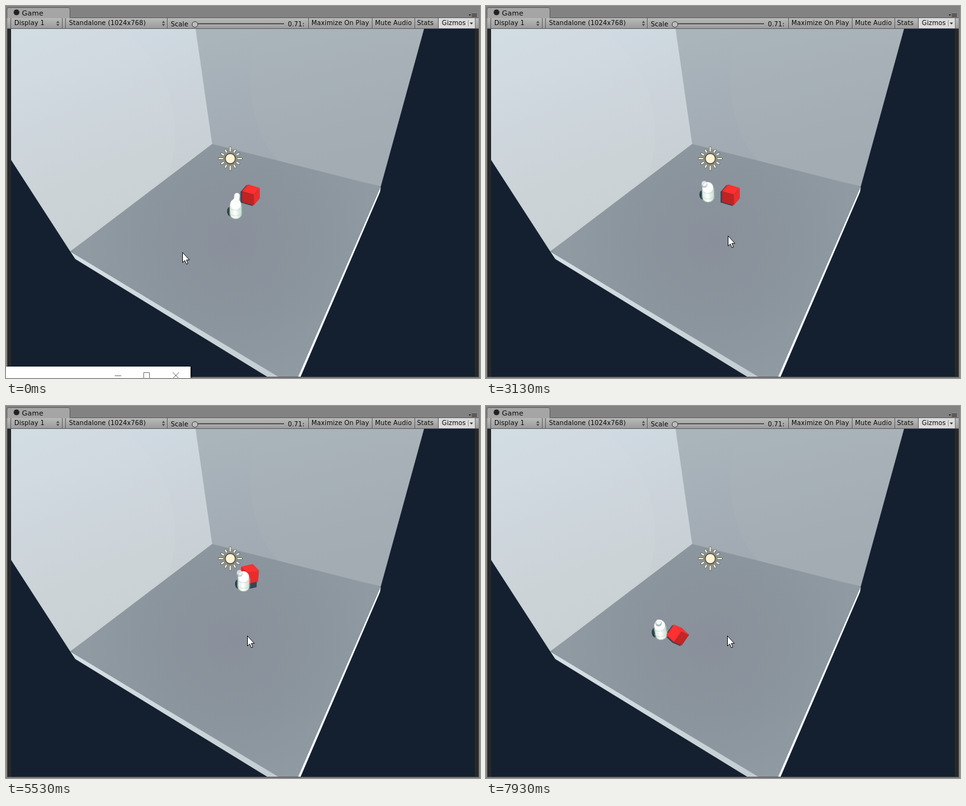
Animation, 745 px wide and 585 px high, one loop 8000 ms. Source, as an HTML page:

```html
<!DOCTYPE html>
<html lang="en">
<head>
<meta charset="utf-8">
<title>Room with cube</title>
<style>
  html, body { margin: 0; width: 100%; height: 100%; overflow: hidden; background: #828282; }
  svg { display: block; width: 745px; height: 585px; }
  text { font: 10px "DejaVu Sans", sans-serif; letter-spacing: .13px; fill: #0b0b0b; }
</style>
</head>
<body>
<svg viewBox="0 0 745 585">
  <defs>
    <linearGradient id="bar" x2="0" y2="1">
      <stop stop-color="#b9b9b9"/><stop offset="1" stop-color="#9c9c9c"/>
    </linearGradient>
    <linearGradient id="wallL" gradientUnits="userSpaceOnUse" x1="40" y1="36" x2="160" y2="350">
      <stop stop-color="#d1dde5"/><stop offset=".5" stop-color="#ccd4db"/><stop offset="1" stop-color="#c7ced1"/>
    </linearGradient>
    <linearGradient id="wallR" gradientUnits="userSpaceOnUse" x1="400" y1="36" x2="450" y2="260">
      <stop stop-color="#a9b4bb"/><stop offset="1" stop-color="#a0a8b1"/>
    </linearGradient>
    <radialGradient id="floor" gradientUnits="userSpaceOnUse" cx="355" cy="370" r="270">
      <stop stop-color="#89909b"/><stop offset=".5" stop-color="#8b959e"/><stop offset="1" stop-color="#919ca4"/>
    </radialGradient>
    <linearGradient id="skin">
      <stop stop-color="#dce8e5"/><stop offset=".45" stop-color="#fff"/><stop offset="1" stop-color="#cddbd8"/>
    </linearGradient>
    <linearGradient id="lip" gradientUnits="userSpaceOnUse" x1="101" y1="390" x2="420" y2="583">
      <stop stop-color="#d6e0e5"/><stop offset="1" stop-color="#c3cdd2"/>
    </linearGradient>
    <clipPath id="clipL"><path d="M8 36H298L324 217 101 386 8 242Z"/></clipPath>
    <clipPath id="clipR"><path d="M298 36H657L589 284 324 217Z"/></clipPath>
    <clipPath id="view"><path d="M8 36H737V583H8Z"/></clipPath>
  </defs>

  <g id="chrome"></g>

  <g clip-path="url(#view)">
    <path d="M8 36H737V583H8Z" fill="#142030"/>
    <!-- surfaces overlap, so no seam shows between them -->
    <path d="M324 210 589 284 459 583 452 598 101 386Z" fill="url(#floor)"/>
    <path d="M290 36H657L589 284 324 217 310 217Z" fill="url(#wallR)"/>
    <ellipse cx="555" cy="120" rx="172" ry="185" fill="#abb2b8" opacity=".25" clip-path="url(#clipR)"/>
    <path d="M8 36H298L324 217 101 386 8 242Z" fill="url(#wallL)"/>
    <ellipse cx="100" cy="200" rx="166" ry="186" fill="#d2dcd9" opacity=".22" clip-path="url(#clipL)"/>
    <path d="M101 386 428 583H410.500L109 398Z" fill="url(#lip)"/>
    <path d="M589 284 588 292 463 583H459Z" fill="#fbfdfd"/>
    <g id="actors">
      <path id="cubeShade" fill="#303c4b" opacity=".9"/>
      <g id="player">
        <ellipse cx="-7.500" cy="5" rx="6" ry="8" fill="#2d3b49"/>
        <g id="torso">
          <path d="M-9 9V-5A9 10 0 0 1 9 -5V9A9 7.500 0 0 1 -9 9Z" fill="url(#skin)"/>
          <g fill="none" stroke="#93cf9b" stroke-width=".8" opacity=".85">
            <path d="M-9.800 -4V9A9.800 8 0 0 0 9.800 9V-4"/>
            <path d="M-9.800 -2A9.800 5 0 0 0 9.800 -2M-9.800 6A9.800 6 0 0 0 9.800 6" opacity=".6"/>
          </g>
          <circle cy="-6" r="8" fill="#fff"/>
        </g>
        <path id="nose" stroke="#fbfdfd" stroke-width="8.500" stroke-linecap="round"/>
        <g id="noseCap"><circle r="5" cy="1" fill="#a9b4b9"/><circle r="4" cy="-1" fill="#f3f6f6"/></g>
      </g>
      <g id="cube"><path/><path/><path/></g>
    </g>
    <g id="sun" stroke-linecap="round"></g>
  </g>

  <g id="popup">
    <path d="M0 566H293V585H0Z" fill="#000" opacity=".3"/>
    <path d="M0 567H290V585H0Z" fill="#fff"/>
    <path d="M171 581.500H181M216.500 585V576.500H225.500V585M262 576 272 586M272 576 262 586" fill="none" stroke="#777"/>
  </g>
  <path id="cursor" d="M.5 .5V16.500L4 13.200 6.600 19 9 18 6.500 12.300H11.300Z" fill="#fff" stroke="#111"/>
</svg>

<script>
const $ = id => document.getElementById(id);
const LOOP = 8000, STEP = 1000 / 15;

function label(text, x, y, size = 10) {
  return `<text x="${x}" y="${y}" style="font-size:${size}px">${text}</text>`;
}
function rect(x, y, w, h, fill) {
  return `<rect x="${x}" y="${y}" width="${w}" height="${h}" fill="${fill}"/>`;
}
function drawChrome() {
  const seps = [7, 88, 93, 253, 475, 575, 642, 679].map(x => rect(x, 19, 1, 16, '#626262')).join('');
  const arrows = [81.5, 247.5].map(x =>
    `<path d="M${x - 2.5} 26.500h5l-2.500 -3zM${x - 2.5} 28.500h5l-2.500 3z" fill="#444"/>`).join('');
  $('chrome').innerHTML =
    rect(0, 0, 745, 585, '#828282') +
    '<path d="M1.500 19V5Q1.500 2.500 4 2.500H98Q100.500 2.500 100.500 5V19Z" fill="#a5a5a5" stroke="#5e5e5e"/>' +
    rect(2, 18, 741, 18, '#5f5f5f') + rect(2, 19, 741, 16, 'url(#bar)') +
    rect(2, 18, 98, 1, '#a5a5a5') + rect(680, 19, 57, 16, '#dcdcdc') + seps +
    rect(726, 22, 1, 10, '#999') + rect(737, 19, 1, 16, '#777') +
    rect(2, 36, 741, 548, '#292929') + rect(2, 583, 741, 1, '#555') +
    '<circle cx="16.500" cy="10" r="4.500" fill="#222"/>' +
    label('Game', 25, 15, 11.2) + label('Display 1', 13, 30) +
    label('Standalone (1024x768)', 99, 30) + label('Scale', 259, 32) +
    label('0.71:', 443, 32) + label('Maximize On Play', 480, 30) +
    label('Mute Audio', 580, 30) + label('Stats', 646, 30) + label('Gizmos', 685, 30) + arrows +
    rect(293, 27, 144, 3, '#555') + rect(293, 29, 144, 1, '#bbb') +
    '<circle cx="297" cy="29" r="4.500" fill="#bdbdbd" stroke="#404040"/>' +
    '<path d="M729 26h5l-2.500 3zM727 13h4l-2 3z" fill="#333"/>' +
    '<path d="M732 12.500h8M732 14.500h8M732 16.500h8" stroke="#333"/>';
}
function drawSun() {
  let d = '';
  for (let i = 0; i < 12; i++) {
    const a = i * Math.PI / 6, r = i % 3 ? 15.5 : 17.5;
    const at = k => `${352.5 + k * Math.cos(a)} ${240 + k * Math.sin(a)}`;
    d += `M${at(12)}L${at(r)}`;
  }
  $('sun').innerHTML =
    `<path d="${d}" stroke="#453f31" stroke-width="3.600" opacity=".75"/><path d="${d}" stroke="#fff5da" stroke-width="2.200"/>` +
    '<circle cx="352.500" cy="240" r="8" fill="#fff2d0" stroke="#514936" stroke-width="1.500"/>';
}

// waypoints: time, x, y, heading in degrees (0 looks away from the viewer)
const walk = [
  [2133, 361, 318, 15], [2933, 348, 284, -25], [3800, 352, 317, -180], [4800, 370, 280, -310],
  [5200, 382, 271, -300], [6333, 353, 284, -510], [7000, 319, 304, -430], [7933, 274, 351, -520]
];
// waypoints: time, centre x, y, yaw and roll in degrees
const carry = [
  [3333, 385, 297, -63, 0], [3800, 387, 304, -58, 0], [4800, 386, 270.5, -18, 0], [5200, 402, 251, -20, 0],
  [6333, 337.5, 296, -56, 16], [7000, 305.5, 328, -41, 43], [7933, 301.5, 360, -51, 35]
];
// waypoints: time, x, y
const mouse = [
  [0, 277, 387], [600, 277, 386], [1000, 120, 150], [1267, 352, 46], [1600, 352, 46],
  [1933, 385, 345], [2267, 380, 361], [8500, 379, 361]
];

// position between waypoints, with the share of the segment that has passed
function along(keys, t) {
  const next = keys.findIndex(k => k[0] > t);
  if (next === 0) return { from: keys[0], to: keys[0], p: 0 };
  if (next < 0) return { from: keys.at(-1), to: keys.at(-1), p: 0 };
  const from = keys[next - 1], to = keys[next];
  return { from, to, p: (t - from[0]) / (to[0] - from[0]) };
}
const mix = (a, b, p) => a + (b - a) * p;
function sample(keys, t) {
  const { from, to, p } = along(keys, t);
  return from.slice(1).map((v, i) => mix(v, to[i + 1], p));
}
const rad = deg => deg * Math.PI / 180;
const add = (...v) => v.reduce((s, p) => [s[0] + p[0], s[1] + p[1]], [0, 0]);
const poly = pts => 'M' + pts.map(p => p.map(n => n.toFixed(2)).join(' ')).join('L') + 'Z';

// the three edges leaving the nearest corner: left, right and down
function cubeEdges(yaw, roll) {
  const size = 20.6, pitch = rad(35 - .7 * roll), r = rad(roll);
  const turn = (x, y) => [size * (x * Math.cos(r) - y * Math.sin(r)), size * (x * Math.sin(r) + y * Math.cos(r))];
  const flat = deg => turn(Math.cos(rad(deg)), Math.sin(rad(deg)) * Math.sin(pitch));
  return [flat(yaw - 90), flat(yaw), turn(0, Math.cos(pitch))];
}
function drawCube(t) {
  const [x, y, yaw, roll] = sample(carry, t);
  const [a, b, c] = cubeEdges(yaw, roll);
  const near = add([x, y], add(a, b, c).map(v => -v / 2));
  const faces = [[a, b, 255], [a, c, Math.min(255, 190 + 4 * roll)], [b, c, 238 - 1.2 * roll]];
  faces.forEach(([u, v, red], i) => {
    const face = $('cube').children[i];
    face.setAttribute('d', poly([near, add(near, u), add(near, u, v), add(near, v)]));
    face.setAttribute('fill', `rgb(${red},${red * .19},${red * .19})`);
  });
  const lift = 8 * Math.sin(Math.PI * Math.min(1, Math.max(0, (t - 4133) / 2533)));
  const rim = [a, add(a, b), b, add(b, c), c, add(a, c)];
  $('cubeShade').setAttribute('d', poly(rim.map(p => add(p, near, [-2.5, 1 + lift]))));
  return y;
}
function drawPlayer(t) {
  const [x, y] = sample(walk, t);
  const { from, to, p } = along(walk, t);
  const heading = rad(mix(from[3], to[3], Math.min(1, p * 3)));
  const nx = 8 * Math.sin(heading), ny = -15 - 5 * Math.cos(heading);
  const front = Math.max(0, -Math.cos(heading));
  $('player').setAttribute('transform', `translate(${x} ${y})`);
  $('torso').setAttribute('transform', `rotate(${(x - 370) * .1})`);
  $('nose').setAttribute('d', `M${nx * .35} -9L${nx} ${ny}`);
  $('nose').setAttribute('opacity', 1 - front);
  $('noseCap').setAttribute('transform', `translate(${nx} ${ny})`);
  $('noseCap').setAttribute('opacity', front);
  return y;
}
function render(ms) {
  const t = Math.floor((ms + 5) / STEP) * STEP + .5;
  const cubeY = drawCube(t), playerY = drawPlayer(t);
  const [first, second] = cubeY > playerY ? ['player', 'cube'] : ['cube', 'player'];
  if ($(first).nextElementSibling !== $(second)) $('actors').append($(first), $(second));
  const [x, y] = sample(mouse, t).map(Math.round);
  $('cursor').setAttribute('transform', `translate(${x} ${y})`);
  $('popup').setAttribute('visibility', ms < 530 ? 'visible' : 'hidden');
}

drawChrome();
drawSun();
const start = performance.now();
function tick() {
  render((performance.now() - start) % LOOP);
  requestAnimationFrame(tick);
}
tick();
</script>
</body>
</html>
```
